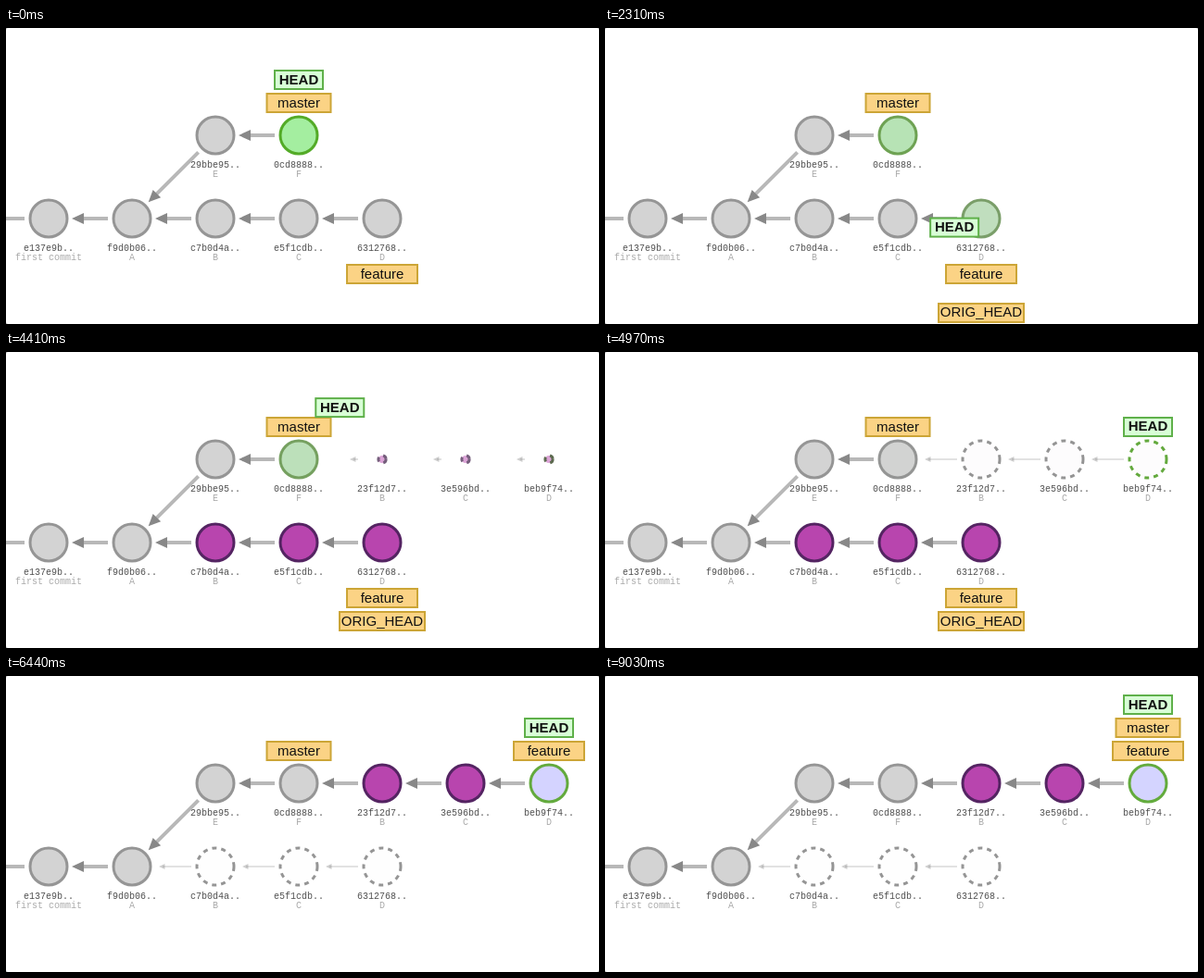
Write an HTML page that moves like this. It is 640 by 320 pixels and loops after 9.1 s.

```html
<!DOCTYPE html>
<html lang="en">
<head>
<meta charset="utf-8">
<title>Commit graph rebase</title>
<style>
  html, body { margin: 0; width: 100%; height: 100%; overflow: hidden; background: #999; }
  svg { display: block; width: 640px; height: 320px; }
  text { text-anchor: middle; }
  .id, .msg { font: 10px "Liberation Mono", "Courier New", monospace; }
  .id { fill: #505050; }
  .msg { fill: #aaa; }
  .tag rect { fill: #fbd385; stroke: #cca536; stroke-width: 2; }
  .tag text { font: 15px "Liberation Sans", Arial, sans-serif; fill: #111; }
  .head rect { fill: #d8ffd6; stroke: #5fb04a; }
  .head text { font-weight: bold; }
  .node { stroke-width: 3; }
</style>
</head>
<body>
<svg viewBox="0 0 640 320">
  <rect width="640" height="320" rx="2" fill="#fff"/>
  <g id="arrows"></g><g id="nodes"></g><g id="labels"></g><g id="tags"></g>
</svg>
<script>
const LOOP = 9100, STEP = 70, FADE = 1000;

// Start of each action and how long its movement takes.
const checkout = [390, 800], detach = [1965, 800], mark = [3130, 800], copy = [4110, 870],
      attach = [5150, 880], back = [6430, 880], merge = [7970, 880];

const looks = {
  grey:   [[211, 211, 211], [149, 149, 149]],
  green:  [[164, 238, 160], [83, 171, 39]],
  purple: [[184, 69, 174], [84, 36, 98]],
  blank:  [[254, 254, 254], [149, 149, 149]],
  fresh:  [[254, 254, 254], [99, 171, 61]],
  blue:   [[212, 212, 255], [99, 171, 61]]
};

const clamp = v => Math.max(0, Math.min(1, v));
const lerp = (a, b, p) => a + (b - a) * p;
const mix = (a, b, p) => a.map((v, i) => lerp(v, b[i], p));
const cubic = p => p < .5 ? 4 * p ** 3 : 1 - 4 * (1 - p) ** 3;
const moved = (t, [start, dur]) => cubic(clamp((t - start) / dur));

// CSS "ease" curve, solved by bisection.
function ease(x) {
  let lo = 0, hi = 1, u = .5;
  for (let i = 0; i < 20; i++) {
    u = (lo + hi) / 2;
    if (.75 * u * (1 - u) + u ** 3 < x) lo = u; else hi = u;
  }
  return .3 * u * (1 - u) ** 2 + 3 * u * u * (1 - u) + u ** 3;
}

function make(tag, parent, attrs = {}, text = '') {
  const el = document.createElementNS('http://www.w3.org/2000/svg', tag);
  for (const k in attrs) el.setAttribute(k, attrs[k]);
  el.textContent = text;
  document.getElementById(parent)?.append(el);
  return el;
}

// kind: "kept" stays, "old" is left behind, "new" is the rebased copy.
const commit = (x, y, id, msg, kind, look, ...fades) => ({ x, y, id, msg, kind, look, fades });
const old = [[mark, 'purple'], [attach, 'grey', true], [attach, 'blank']];
const fresh = [[copy, 'blank'], [attach, 'purple']];
const commits = [
  commit(46, 206, 'e137e9b', 'first commit', 'kept', 'grey'),
  commit(136, 206, 'f9d0b06', 'A', 'kept', 'grey'),
  commit(226, 116, '29bbe95', 'E', 'kept', 'grey'),
  commit(316, 116, '0cd8888', 'F', 'kept', 'green', [checkout, 'grey'], [detach, 'green'],
    [copy, 'grey'], [back, 'green'], [merge, 'grey']),
  commit(226, 206, 'c7b0d4a', 'B', 'old', 'grey', ...old),
  commit(316, 206, 'e5f1cdb', 'C', 'old', 'grey', ...old),
  commit(406, 206, '6312768', 'D', 'old', 'grey', [checkout, 'green'], [detach, 'grey'], ...old),
  commit(406, 116, '23f12d7', 'B', 'new', 'purple', ...fresh),
  commit(496, 116, '3e596bd', 'C', 'new', 'purple', ...fresh),
  commit(586, 116, 'beb9f74', 'D', 'new', 'purple', [copy, 'fresh'], [attach, 'blue'],
    [back, 'purple'], [merge, 'blue'])
];

const ref = (name, w, x, y, ...moves) => ({ name, w, x, y, moves });
const refs = [
  ref('feature', 76, 406, 266, [attach, 586, 81]),
  ref('master', 69, 316, 81, [merge, 586, 56]),
  ref('ORIG_HEAD', 92, 406, 316, [detach, 406, 291]),
  ref('HEAD', 52, 316, 56, [checkout, 406, 291], [detach, 316, 56], [copy, 586, 81],
    [attach, 586, 56], [back, 316, 56], [merge, 586, 31])
];

for (const c of commits) {
  c.line = make('line', 'arrows', { stroke: '#b8b8b8' });
  c.tip = make('path', 'arrows', { d: 'M-2 0L1.25-1.5V1.5Z', fill: '#888' });
  c.dot = make('circle', 'nodes', { class: 'node', cx: c.x, cy: c.y, r: 20 });
  c.texts = [
    make('text', 'labels', { class: 'id', x: c.x, y: c.y + 34.5 }, c.id + '..'),
    make('text', 'labels', { class: 'msg', x: c.x, y: c.y + 44.5 }, c.msg)
  ];
  // The parent sits one column left; E hangs off A in the lower row.
  const dx = -90, dy = c.msg === 'E' ? 90 : 0, len = Math.hypot(dx, dy);
  c.dir = [dx / len, dy / len];
  c.reach = len - 59;
}

for (const r of refs) {
  r.el = make('g', 'tags', { class: r.name === 'HEAD' ? 'tag head' : 'tag' });
  r.el.append(
    make('rect', '', { x: -r.w / 2, y: -10, width: r.w, height: 20 }),
    make('text', '', { y: 4.5 }, r.name));
}

function drawCommit(c, t) {
  const grow = c.kind === 'new' ? moved(t, copy) : 1;
  const shown = c.kind !== 'new' || t >= copy[0];
  const loose = c.kind !== 'kept' && (t >= attach[0]) === (c.kind === 'old');
  let [fill, stroke] = looks[c.look];
  for (const [[start], look, cut] of c.fades) {
    if (t < start) break;
    const p = cut ? 1 : ease(clamp((t - start) / FADE));
    fill = mix(fill, looks[look][0], p);
    stroke = mix(stroke, looks[look][1], p);
  }
  c.dot.setAttribute('fill', `rgb(${fill.map(Math.round)})`);
  c.dot.setAttribute('stroke', `rgb(${stroke.map(Math.round)})`);
  c.dot.setAttribute('r', lerp(1, 20, grow));
  c.dot.setAttribute('stroke-dasharray', loose ? '5' : 'none');

  const [ux, uy] = c.dir, w = loose ? 2 : 4, far = 26 + c.reach * grow;
  const ends = { x1: c.x + ux * 26, y1: c.y + uy * 26, x2: c.x + ux * far, y2: c.y + uy * far };
  for (const k in ends) c.line.setAttribute(k, ends[k]);
  c.line.setAttribute('stroke-width', w);
  const turn = Math.atan2(-uy, -ux) * 180 / Math.PI;
  c.tip.setAttribute('transform', `translate(${ends.x2} ${ends.y2}) rotate(${turn}) scale(${w})`);
  for (const el of [c.line, c.tip]) el.setAttribute('opacity', loose ? .4 : 1);
  for (const el of [c.line, c.tip, c.dot, ...c.texts]) el.style.display = shown ? '' : 'none';
}

function drawRef(r, t) {
  let pos = [r.x, r.y];
  for (const [time, x, y] of r.moves) pos = mix(pos, [x, y], moved(t, time));
  r.el.setAttribute('transform', `translate(${pos})`);
  if (r.name === 'ORIG_HEAD')
    r.el.style.display = t >= detach[0] && t < attach[0] ? '' : 'none';
}

const origin = performance.now();
function frame() {
  const now = (performance.now() - origin) % LOOP;
  const t = Math.floor(now / STEP) * STEP;
  commits.forEach(c => drawCommit(c, t));
  refs.forEach(r => drawRef(r, t));
  requestAnimationFrame(frame);
}
frame();
</script>
</body>
</html>
```
